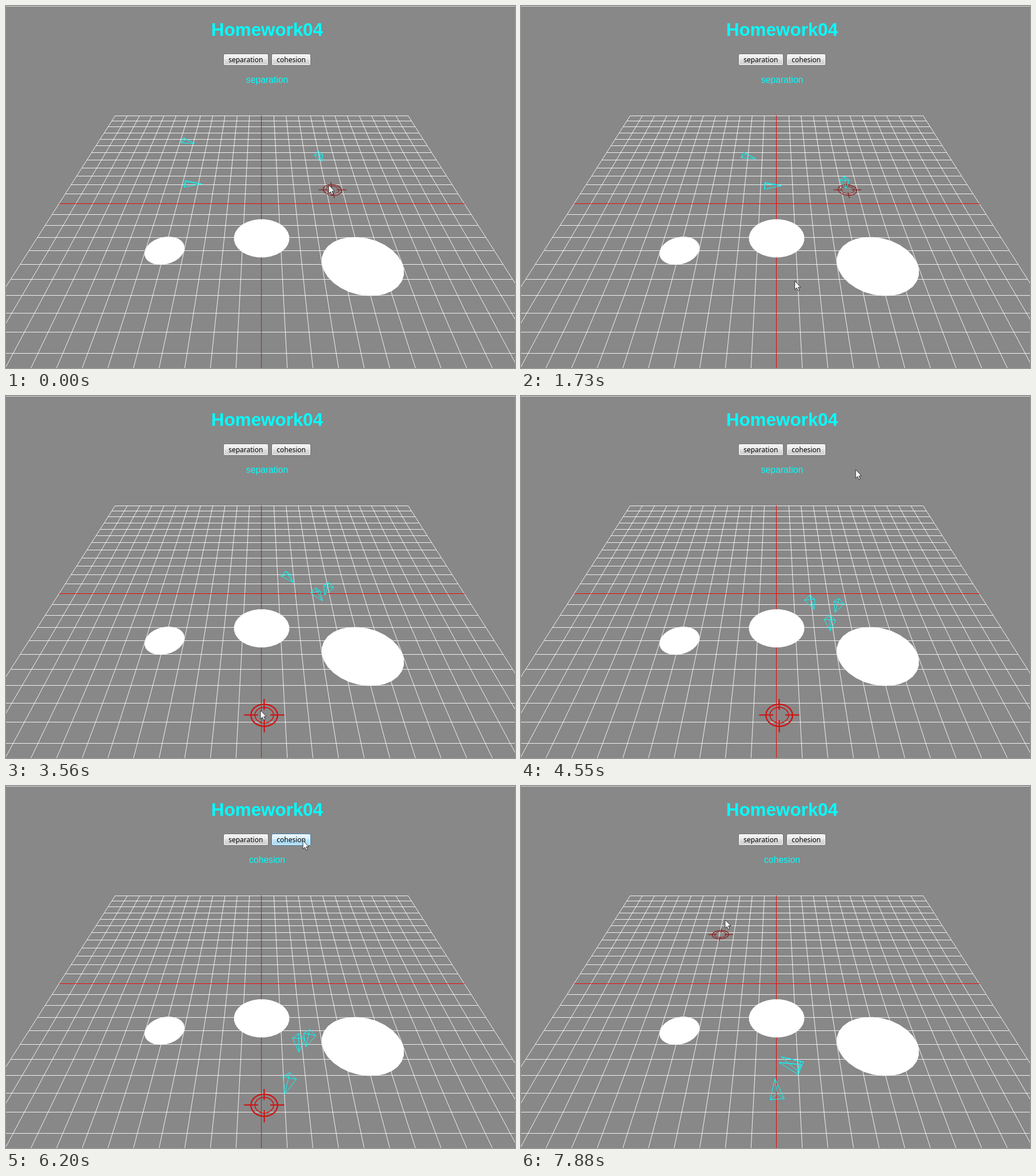
These frames come from a looping animation (888 by 631 pixels, 8000 ms). An HTML page with a canvas:

```html
<!DOCTYPE html>
<html lang="en">
<head>
<meta charset="utf-8">
<title>Homework04</title>
<style>
html, body { margin: 0; width: 888px; height: 631px; overflow: hidden; background: #888; }
canvas, svg { position: absolute; left: 0; top: 0; }
text { text-anchor: middle; font-family: "Liberation Sans", Arial, sans-serif; fill: #0ff; }
.btn text { font: 12px "Noto Sans", "Open Sans", sans-serif; fill: #000; }
</style>
</head>
<body>
<canvas id="scene" width="888" height="631"></canvas>
<svg width="888" height="631">
  <defs>
    <linearGradient id="plain" x2="0" y2="1">
      <stop offset="0" stop-color="#f3f3f3"/><stop offset=".48" stop-color="#ebebeb"/>
      <stop offset=".5" stop-color="#dddddd"/><stop offset="1" stop-color="#cfcfcf"/>
    </linearGradient>
    <linearGradient id="hot" x2="0" y2="1">
      <stop offset="0" stop-color="#eaf6fd"/><stop offset=".48" stop-color="#d9f0fc"/>
      <stop offset=".5" stop-color="#bee6fd"/><stop offset="1" stop-color="#a7d9f5"/>
    </linearGradient>
  </defs>
  <text x="455.5" y="51.5" font-size="31.3" font-weight="bold">Homework04</text>
  <g class="btn">
    <rect x="379.5" y="83.5" width="78" height="20" rx="2.5" fill="#f8f8f8" stroke="#707070"/>
    <rect x="381" y="85" width="75" height="17" rx="1" fill="url(#plain)"/>
    <text x="418.3" y="98">separation</text>
  </g>
  <g class="btn">
    <rect id="edge" x="463.5" y="83.5" width="68" height="20" rx="2.5" fill="#f8f8f8" stroke="#707070"/>
    <rect id="face" x="465" y="85" width="65" height="17" rx="1" fill="url(#plain)"/>
    <text x="497.6" y="98">cohesion</text>
  </g>
  <text id="mode" x="455.5" y="134" font-size="15.7">separation</text>
  <path id="cursor" d="M0 0V15L3.4 11.8 5.6 17 8 16 5.8 10.9H10.3Z" fill="#fff" stroke="#222" stroke-width=".9"/>
</svg>
<script>
const $ = id => document.getElementById(id);
const g = $("scene").getContext("2d");
const W = 888, H = 631, TAU = Math.PI * 2;

// The picture updates in equal steps; all keys below count steps
const LOOP = 8000, STEP = 137.9, LEAD = 50, LAST = 57;

// Ground plane: one unit is one grid cell, row 0 is the red line
const CX = 446, HORIZON = -208.5, DEPTH = 31.23, KY = 17271, KX = 920, LIFT = 0.46;
const project = (x, row, z = 0) => {
  const d = DEPTH - row;
  return [CX + KX * x / d, HORIZON + KY / d - KX * LIFT * z / d];
};
const unproject = (sx, sy) => {
  const d = KY / (sy - HORIZON);
  return [(sx - CX) * d / KX, DEPTH - d];
};

// Each boid follows a curve through a few screen points of its tip
const KEYS = [0, 8, 17, 26, 40, 50, LAST];
const LENGTH = 1.05, RADIUS = 0.36;
const boids = [
  [[329, 240], [378, 257], [450, 281], [501, 325], [512, 426], [498, 494], [450, 482]],
  [[341, 310], [411, 313], [506, 318], [552, 357], [510, 477], [452, 584], [443, 510]],
  [[551, 271], [566, 306], [565, 329], [556, 347], [536, 416], [500, 491], [454, 472]]
].map(path => aim(path.map(p => unproject(...p))));

// Heading: mostly the way just travelled, a little of the way ahead
function aim(tips) {
  return tips.map((tip, i) => {
    const before = tips[i - 1] || tip, after = tips[i + 1] || tip;
    const [dx, dy] = tip.map((v, c) => v - before[c] + 0.2 * (after[c] - v));
    const a = (Math.atan2(dy, dx) + TAU) % TAU;
    return [tip[0] - Math.cos(a) * LENGTH / 2, tip[1] - Math.sin(a) * LENGTH / 2, a];
  });
}

// Pointer stops: step, x, y
const STOPS = [[4, 563, 312], [8, 545, 342], [14, 444, 548], [27, 444, 548], [32, 597, 135],
  [38, 518, 95], [45, 518, 95], [50, 345, 252], [53, 345, 252], [56, 356, 233]];

function segment(times, n) {
  let i = 0;
  while (i < times.length - 2 && n >= times[i + 1]) i++;
  const u = (n - times[i]) / (times[i + 1] - times[i]);
  return [i, Math.max(0, Math.min(1, u))];
}

function spline(keys, n) {
  const [i, u] = segment(KEYS, n), last = keys.length - 1;
  const span = KEYS[i + 1] - KEYS[i], v = u * u, w = v * u;
  return keys[i].map((p, c) => {
    const slope = k => {
      const a = Math.max(0, k - 1), b = Math.min(last, k + 1);
      return (keys[b][c] - keys[a][c]) / (KEYS[b] - KEYS[a]) * span;
    };
    const q = keys[i + 1][c];
    return p + (q - p) * (3 * v - 2 * w) + slope(i) * (w - 2 * v + u) + slope(i + 1) * (w - v);
  });
}

function pointerAt(n) {
  const [i, u] = segment(STOPS.map(s => s[0]), n);
  return [1, 2].map(c => STOPS[i][c] + (STOPS[i + 1][c] - STOPS[i][c]) * u);
}

function trace(points, closed) {
  g.beginPath();
  points.forEach(p => g.lineTo(...p));
  if (closed) g.closePath();
}

function line(a, b, color) {
  g.strokeStyle = color;
  trace([a, b]);
  g.stroke();
}

function drawGrid() {
  g.lineWidth = 1;
  const white = "rgba(255,255,255,.88)";
  for (let i = -12; i <= 12; i++) {
    if (!i) continue;
    const [left, row] = project(-12, i), [right] = project(12, i);
    const y = Math.round(row) + 0.5;
    line([left, y], [right, y], white);
    line(project(i, -12), project(i, 12), white);
  }
  line([445.5, 191], [445.5, H], "#e80808");
  line([93, 344.5], [800, 344.5], "#f00808");
}

// Half width, half height and skew of the outline
function drawBall(cx, cy, w, h, skew) {
  const s = skew / w, r = Math.sqrt(h * h - s * s);
  trace(Array.from({ length: 28 }, (_, i) => {
    const a = (i + 0.5) / 28 * TAU;
    return [cx + w * Math.cos(a), cy + s * Math.cos(a) + r * Math.sin(a)];
  }), true);
  g.fillStyle = "#fff";
  g.fill();
}

function drawTarget(sx, sy, near) {
  const [x, row] = unproject(sx, sy);
  const at = (r, a) => project(x + r * Math.cos(a), row + r * Math.sin(a));
  const thick = near ? 2.2 : 1.5;
  g.strokeStyle = near ? "#cc1616" : "rgba(138,28,28,.8)";
  [[0.57, thick * 1.1], [0.4, thick * 0.75]].forEach(([r, width]) => {
    g.lineWidth = width;
    trace(Array.from({ length: 40 }, (_, i) => at(r, i / 40 * TAU)), true);
    g.stroke();
  });
  g.lineWidth = thick;
  for (let i = 0; i < 4; i++) {
    const a = i * TAU / 4;
    trace([at(0.26, a), at(0.86, a)]);
    g.stroke();
  }
}

function drawBoid([x, row, a]) {
  const c = Math.cos(a), s = Math.sin(a), half = LENGTH / 2;
  const tip = project(x + c * half, row + s * half);
  const base = [0, 1, 2].map(i => {
    const b = TAU * (i / 3 + 0.25), side = RADIUS * Math.cos(b);
    return project(x - c * half - s * side, row - s * half + c * side, RADIUS * Math.sin(b));
  });
  g.lineWidth = 1;
  g.strokeStyle = "#0ff";
  trace(base, true);
  g.stroke();
  base.forEach(p => line(p, tip, "#0ff"));
}

function draw(n) {
  g.fillStyle = "#888";
  g.fillRect(0, 0, W, H);
  g.fillStyle = "#d8d8d8";
  g.fillRect(0, 0, W, 1);
  drawGrid();
  if (n < 17) drawTarget(569.5, 320.5, false);
  else if (n < 51) drawTarget(450.5, 556, true);
  else drawTarget(348, 259, false);
  drawBall(446, 405, 48.5, 33.5, 0);
  drawBall(276.5, 426.5, 35, 24.5, -175);
  drawBall(622.5, 454, 72, 51.5, 720);
  boids.forEach(keys => drawBoid(spline(keys, n)));

  const [x, y] = pointerAt(n);
  $("cursor").setAttribute("transform", `translate(${x} ${y})`);
  const hot = x > 463 && x < 532 && y > 83 && y < 104;
  $("face").setAttribute("fill", hot ? "url(#hot)" : "url(#plain)");
  $("edge").setAttribute("stroke", hot ? "#3c7fb1" : "#707070");
  $("mode").textContent = n < 42 ? "separation" : "cohesion";
}

const start = performance.now();
function loop() {
  const t = (performance.now() - start) % LOOP;
  draw(Math.min(LAST, Math.floor((t + LEAD) / STEP)));
  requestAnimationFrame(loop);
}
loop();
</script>
</body>
</html>
```
